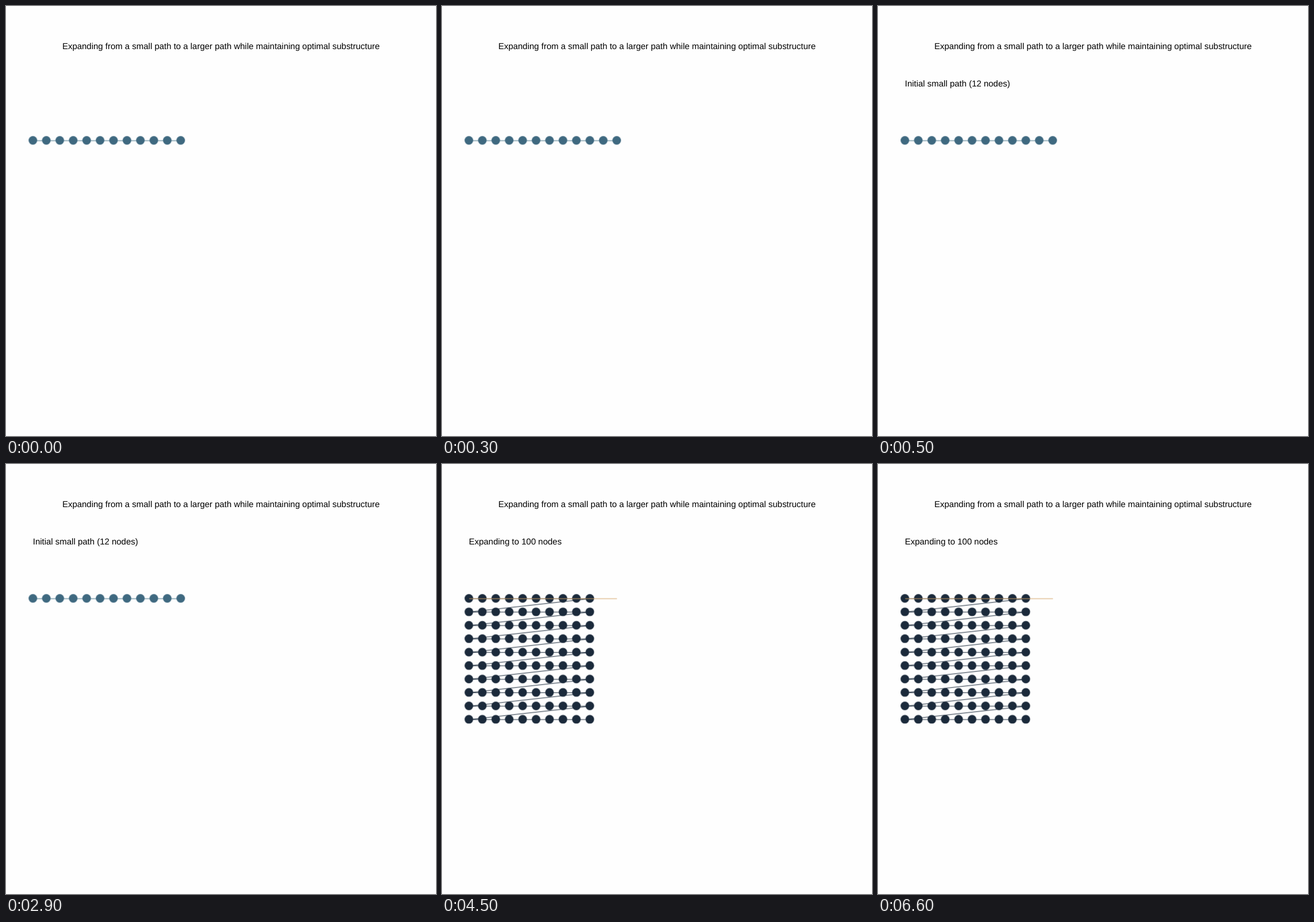
These frames come from a looping animation (748 px wide and 748 px high, 8000 ms). An HTML page:

```html
<!DOCTYPE html>
<html lang="en">
<head>
<meta charset="utf-8">
<title>Expanding path</title>
<style>
  html, body { margin: 0; width: 100%; height: 100%; overflow: hidden; background: #fefefe; }
  svg { display: block; width: 100vw; height: 100vh; }
  text { font: 16px "Liberation Sans", Arial, sans-serif; fill: #000; text-rendering: geometricPrecision; }
  .small { fill: #3f6980; stroke: #3f7086; }
  .large { fill: #1b2a3b; stroke: #1b2a3b; }
  .optimal { stroke: #d6a467; }
  .link { fill: none; stroke-width: 1.07; }
  .nodes { stroke: none; }
  #small { animation: small 8s step-end infinite; }
  #smallLabel { animation: smallLabel 8s step-end infinite; }
  #expanded { animation: expanded 8s step-end infinite; }
  @keyframes small { 0% { opacity: 1 } 56.25%, 100% { opacity: 0 } }
  @keyframes smallLabel { 0% { opacity: 0 } 6.25% { opacity: 1 } 56.25%, 100% { opacity: 0 } }
  @keyframes expanded { 0% { opacity: 0 } 56.25%, 100% { opacity: 1 } }
</style>
</head>
<body>
<svg viewBox="0 0 800 800">
  <text x="400" y="80" text-anchor="middle">Expanding from a small path to a larger path while maintaining optimal substructure</text>
  <g id="small"></g>
  <text id="smallLabel" x="50" y="150">Initial small path (12 nodes)</text>
  <g id="expanded">
    <text x="50" y="150">Expanding to 100 nodes</text>
  </g>
</svg>
<script>
  const STEP = 25, LEFT = 50, TOP = 250, RADIUS = 8;

  function add(parent, tag, attrs) {
    const el = document.createElementNS("http://www.w3.org/2000/svg", tag);
    for (const key in attrs) el.setAttribute(key, attrs[key]);
    return parent.appendChild(el);
  }

  const layout = (count, columns) => Array.from({ length: count }, (_, i) => [
    LEFT + (i % columns) * STEP,
    TOP + Math.floor(i / columns) * STEP
  ]);

  // Half-unit offset keeps the thin links crisp
  const addLinks = (parent, points, style) => add(parent, "polyline", {
    points: points.join(" "), class: style + " link", transform: "translate(.5 .5)"
  });

  function addNodes(parent, points, style) {
    const group = add(parent, "g", { class: style + " nodes" });
    for (const [cx, cy] of points) add(group, "circle", { cx, cy, r: RADIUS });
  }

  const small = document.getElementById("small");
  const expanded = document.getElementById("expanded");
  const row = layout(12, 12), grid = layout(100, 10);

  addLinks(small, row, "small");
  addNodes(small, row, "small");
  addLinks(expanded, grid, "large");
  addNodes(expanded, grid, "large");
  addLinks(expanded, row, "optimal");
</script>
</body>
</html>
```
